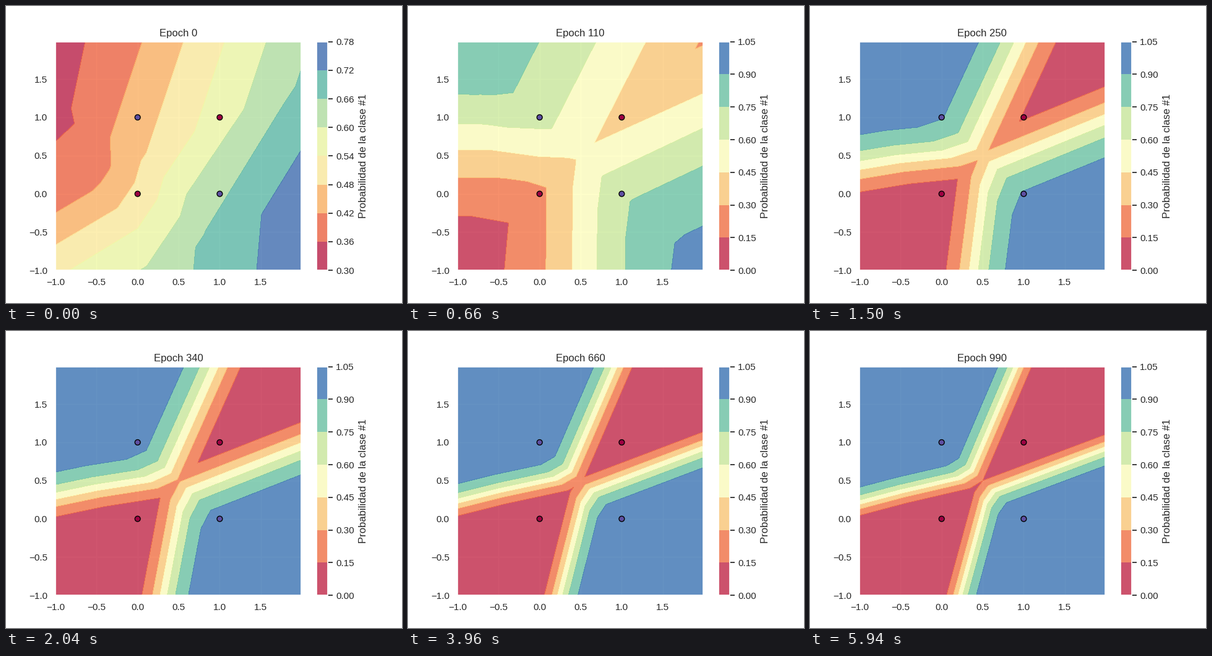
Recreate the animation shown at these times as a matplotlib script. Size 640 px wide and 480 px high, loop 6 s.

```python
import numpy as np
import matplotlib.pyplot as plt
from matplotlib.animation import FuncAnimation

INK = "0.15"
plt.rcParams.update({
    "font.family": "Liberation Sans", "text.color": INK,
    "axes.facecolor": "#EAEAF2", "axes.edgecolor": "white",
    "axes.linewidth": 1.25, "axes.labelcolor": INK,
    "axes.labelsize": 12, "axes.titlesize": 12,
    "axes.grid": True, "axes.axisbelow": True,
    "grid.color": "white", "grid.linestyle": "-", "grid.linewidth": 1,
    "xtick.color": INK, "ytick.color": INK,
    "xtick.labelsize": 11, "ytick.labelsize": 11,
    "xtick.major.size": 6, "ytick.major.size": 6,
    "xtick.major.width": 1.25, "ytick.major.width": 1.25,
    "xtick.bottom": False, "ytick.left": False,
})

FRAMES, INTERVAL, EPOCHS_PER_FRAME = 100, 60, 10
BEND_EPOCH, SPLIT_EPOCH, LAST_EPOCH = 60, 180, 990
W, H, DPI = 640, 480, 100
LO, HI = -1, 1.99

axis = np.arange(LO, 2, 0.01)
X, Y = np.meshgrid(axis, axis)


def relu(v):
    return np.maximum(v, 0)


def plane(gx, gy, offset):
    return gx * X + gy * Y + offset


def highest(*fields):
    return np.maximum.reduce(fields)


def lowest(*fields):
    return np.minimum.reduce(fields)


def mix(a, b, t):
    return a + (b - a) * t


def start_field():
    """Untrained network: a tilted, slightly folded sheet of logits."""
    dent = np.clip(.17 * plane(-.8, -1, .47), 0, .06)
    top = highest(plane(.481, -.15, -.051), plane(.36, -.07, -.206))
    right = lowest(plane(.585, -.367, .054) - dent,
                   plane(.503, -.289, .108), plane(.366, -.03, .384))
    bottom = lowest(plane(.368, -.578, -.098), plane(.285, -.434, -.036))
    left = plane(.231, -.231, -.186)
    return highest(top - dent, right, bottom, left)


def bend_field():
    """The sheet folded into a low left side and a high lower right."""
    slopes = highest(plane(.4, .6, -.496), plane(.17, .56, -.609),
                     plane(.8, -.05, -.33), plane(.62, -.18, -.438))
    roof = highest(plane(.366, -.645, .123), plane(0, 0, .05))
    return lowest(slopes, roof)


def split_field(epoch):
    """Trained network: every weight follows one growing steepness."""
    t = np.log(epoch / SPLIT_EPOCH) / np.log(LAST_EPOCH / SPLIT_EPOCH)
    steep = 1.8 + 6.66 * t - 1.68 * t ** 2
    saddle = .159 - .28 * steep
    rise, mid, fall = 1.08 + .44 * steep, 1.4, .456 * steep - .19
    knee = .475 + .207 * np.log(steep / 1.8)
    s, d = X + Y, X - Y
    ridge = (saddle - fall * relu(s - 1) - mid * relu(1 - s)
             - (rise - mid) * relu(knee - s))
    return ridge + steep * abs(d) + .03 * d + .35 * relu(plane(-1, -.41, -.34))


START, BEND, SPLIT = start_field(), bend_field(), split_field(SPLIT_EPOCH)


def probability(epoch):
    if epoch <= BEND_EPOCH:
        z = mix(START, BEND, epoch / BEND_EPOCH)
    elif epoch <= SPLIT_EPOCH:
        z = mix(BEND, SPLIT, (epoch - BEND_EPOCH) / (SPLIT_EPOCH - BEND_EPOCH))
    else:
        z = split_field(epoch)
    return 1 / (1 + np.exp(-z))


fig = plt.figure(figsize=(W / DPI, H / DPI), dpi=DPI, facecolor="white")
ax = fig.add_axes([.125, .11, .62, .77])
ax.set(xlim=(LO, HI), ylim=(LO, HI))
title = ax.set_title("Epoch 0")
ax.scatter([0, 0, 1, 1], [0, 1, 0, 1], c=[0, 1, 1, 0], cmap="Spectral",
           s=40, edgecolors="black", linewidths=1, zorder=2)

shown = {"fill": None, "bar": None, "levels": ()}


def draw_bar(fill):
    if shown["bar"]:
        shown["bar"].remove()
    cax = fig.add_axes([.78375, .11, .77 / 20 * H / W, .77])
    cax.grid(False)
    bar = fig.colorbar(fill, cax=cax)
    bar.set_label("Probabilidad de la clase #1", labelpad=5)
    shown["bar"] = cax


def update(i):
    epoch = i * EPOCHS_PER_FRAME
    if shown["fill"]:
        shown["fill"].remove()
    fill = ax.contourf(X, Y, probability(epoch), cmap="Spectral", alpha=0.8)
    shown["fill"] = fill
    levels = tuple(np.round(fill.levels, 4))
    if levels != shown["levels"]:
        draw_bar(fill)
        shown["levels"] = levels
    title.set_text(f"Epoch {epoch}")


anim = FuncAnimation(fig, update, frames=FRAMES, interval=INTERVAL,
                     init_func=lambda: update(0), repeat=True,
                     repeat_delay=0, blit=False)
plt.show()
```
